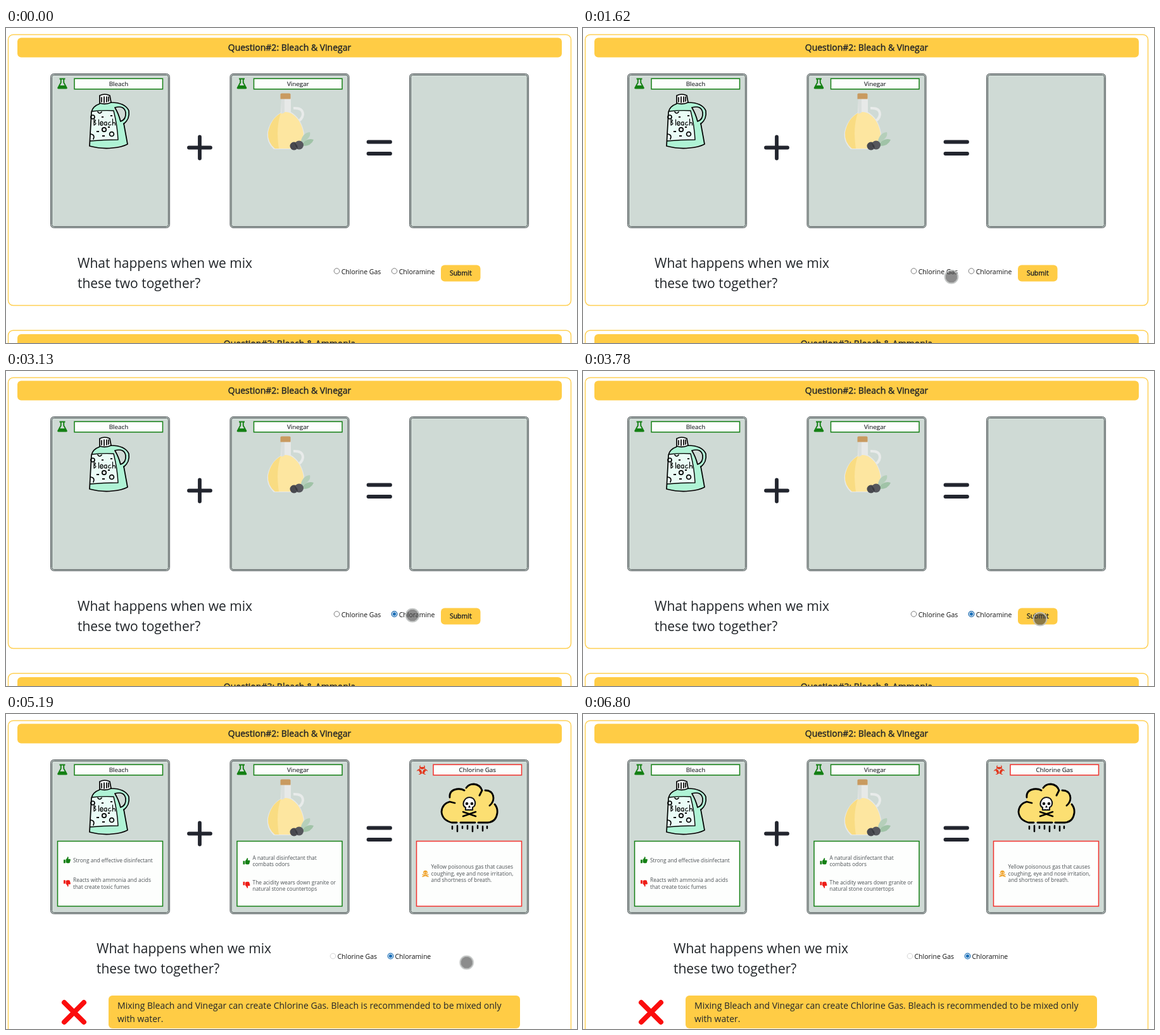
An HTML page for the animation above (7210 ms loop, 902 by 499 pixels).

```html
<!DOCTYPE html>
<html lang="en">
<head>
<meta charset="utf-8">
<title>Mixing quiz</title>
<style>
  html, body { margin: 0; width: 100%; height: 100%; overflow: hidden; background: #fff; }
  svg { display: block; width: 902px; height: 499px; font-family: "Open Sans", sans-serif; }
  text { fill: #212529; white-space: pre; }
  .mid { text-anchor: middle; }
  .title { font-size: 14px; stroke: #212529; stroke-width: .4px; }
  .label { font-size: 9.8px; stroke: #212529; stroke-width: .15px; }
  .ask { font-size: 21px; }
  .opt { font-size: 10.5px; fill: #111; }
  .btn { font-size: 10.5px; stroke: #212529; stroke-width: .4px; }
  .note { font-size: 8.4px; fill: #4c5155; }
  .msg { font-size: 14px; }
  .bar { fill: #ffcc45; }
  .panel { fill: none; stroke: #ffcf50; stroke-width: 1.4; }
  .box { fill: #fdfefd; stroke: #148014; stroke-width: 1.5; }
  .red { stroke: #f3312c; }
  .ink { fill: none; stroke: #000; stroke-width: 1.7; stroke-linecap: round; stroke-linejoin: round; }
  .ring { fill: #fff; stroke: #767676; stroke-width: 1; }
  .blue { fill: #fff; stroke: #1b6fb8; stroke-width: 1.2; }
  .dot { fill: #1b6fb8; }

  .before, .after, .first, .second, .cursor { animation: 7210ms infinite step-end; }
  .before { animation-name: before; }
  .after { animation-name: after; }
  .first { animation-name: first; }
  .second { animation-name: second; }
  .cursor { animation-name: move; animation-timing-function: ease-in-out; }
  @keyframes before { 0% { opacity: 1 } 58.95%, 100% { opacity: 0 } }
  @keyframes after { 0% { opacity: 0 } 58.95%, 100% { opacity: 1 } }
  @keyframes first { 0% { opacity: 0 } 32.04% { opacity: 1 } 41.47%, 100% { opacity: 0 } }
  @keyframes second { 0% { opacity: 0 } 41.47%, 100% { opacity: 1 } }
  @keyframes move {
    0%, 7.49% { transform: translate(650px, 482px); opacity: 0; animation-timing-function: linear }
    10.26% { transform: translate(643px, 471px); opacity: 1; animation-timing-function: linear }
    14.15% { transform: translate(628px, 450px); animation-timing-function: linear }
    16.92%, 17.89% { transform: translate(612px, 428px) }
    23.44%, 34.81% { transform: translate(580px, 392px) }
    39.53%, 47.02% { transform: translate(642px, 387px) }
    52.43%, 71.01% { transform: translate(722px, 393px) }
    77.53%, 89.6% { transform: translate(845px, 407px); opacity: 1; animation-timing-function: linear }
    94.31%, 100% { transform: translate(845px, 407px); opacity: 0 }
  }
</style>
</head>
<body>
<svg viewBox="0 0 902 499">
  <defs>
    <g id="card">
      <rect x=".5" y=".5" width="188" height="244" rx="5" fill="#cfdad5" stroke="#464c4f"/>
      <rect x="2.5" y="2.5" width="184" height="240" rx="3" fill="none" stroke="#464c4f"/>
    </g>
    <rect id="name" x="38" y="8.2" width="139.5" height="16.6"/>
    <rect id="info" x="11.5" y="129.5" width="166" height="103"/>
    <g id="flask" fill="#148014">
      <path d="M-4.5-8.5h9v2h-1.3v4.7L7.5 6Q8.5 8.5 6 8.5H-6Q-8.5 8.5-7.5 6L-3.2-1.8v-4.7h-1.3z"/>
      <path d="M-1.3-6.5h2.6v5.2L3.7 3h-7.4L-1.3-1.3z" fill="#cfdad5"/>
    </g>
    <path id="thumb" d="M-5.5-.8h2.8v5.6h-2.8zM-2-.8L.3-3.7Q.4-6 1.7-5.2 2.8-4.4 1.8-1.8H4.6Q6-1.4 5.3.3L4.2 4Q3.8 4.8 2.8 4.8H0L-2 3.8z"/>
    <g id="claw">
      <path d="M-2.4-2Q-6.3-5-2.7-8.6-4-4.4 0-4.2 4-4.4 2.7-8.6 6.3-5 2.4-2L0-1.2z"/>
    </g>
    <g id="skull">
      <path d="M-3.2.4Q-4.4-4.6 0-4.8 4.4-4.6 3.2.4L1.7 1V2h-3.4V1z"/>
      <path d="M-4.5 1.8L4.5 5M4.5 1.8L-4.5 5" fill="none" stroke="#f0a32c" stroke-width="1.4" stroke-linecap="round"/>
      <path d="M-2.2-1.7h1.3v1.4h-1.3zM.9-1.7h1.3v1.4H.9z" fill="#fff"/>
    </g>
  </defs>

  <rect width="902" height="499" fill="#fff"/>
  <rect class="bar" x="18" y="15.5" width="860" height="31" rx="6"/>
  <text class="title mid" x="448" y="36">Question#2: Bleach &amp; Vinegar</text>

  <use href="#card" x="70" y="72"/>
  <use href="#card" x="353.5" y="72"/>
  <use href="#card" x="637" y="72"/>
  <g class="box">
    <use href="#name" x="70" y="72"/>
    <use href="#name" x="353.5" y="72"/>
  </g>
  <use href="#flask" x="89" y="88"/>
  <use href="#flask" x="372.5" y="88"/>
  <text class="label mid" x="178" y="92">Bleach</text>
  <text class="label mid" x="461.3" y="92">Vinegar</text>

  <!-- bleach bottle -->
  <g>
    <path d="M149 119Q138 123 135 133L132 187Q160 193 192 184L187 152Q197 142 194 131 188 119 166 118z" fill="#aff3d5"/>
    <path d="M174 125Q188 123 190 134 190 145 181 148 177 136 170 127z" fill="#cfdad5"/>
    <path d="M136 132L170 131Q176 155 177 177L133 178z" fill="#eafcf6"/>
    <path d="M148 107Q156 103 164 107L166 118Q157 122 148 119z" fill="#f4f8f6"/>
    <g class="ink">
      <path d="M148 107Q156 103 164 107L166 118Q157 122 148 119zM151 110v7M155 109v9M159 109v8M162 109v7"/>
      <path d="M148 120Q137 124 135 133L132 187Q152 192 168 190 183 189 192 184L186 151"/>
      <path d="M166 118Q188 118 194 131 196 144 186 152M172 126Q187 122 189 134 190 145 181 148 178 136 172 126"/>
      <path d="M136 132Q154 130 170 131 176 155 177 177M133 179Q154 177 177 177" stroke-width="1.4"/>
      <circle cx="155" cy="161" r="3.2"/>
      <circle cx="167" cy="168" r="3.4"/>
      <circle cx="137" cy="141" r="3"/>
      <path d="M145 133q3 4 6 0M134 168q7 1 4 8" />
    </g>
    <path d="M143 163h4v2h-4zM161 156h3v2h-3zM152 170h4v2h-4zM165 138h3v2h-3zM151 140h3v2h-3z"/>
    <path class="ink" stroke-width="1.2" style="stroke-width:1.2" d="M139 145v9M139 145q5 1 0 4 6 2 0 5M146.500 145v9M149 151h4q0-3-2-3-3 1-2 5 2 2 4 0M159 149q-4-1-4 3 1 3 4 1v-4 5M165 149q-4 0-3 4 1 2 4 0M168.500 144v10M168.500 151q4-4 4 3"/>
  </g>

  <!-- vinegar bottle -->
  <g>
    <path d="M454 127Q469 126 469 137 468 146 458 149" fill="none" stroke="#e8ebea" stroke-width="4"/>
    <path d="M435 111h15v22Q466 142 471 166 471 184 461 192H423Q411 181 413 165 417 145 434 134z" fill="#e7e9e8"/>
    <path d="M434 135Q441 131 450 135 466 144 470 167 469 184 459 191H425Q413 181 414 166 418 144 434 135z" fill="#fde6a0"/>
    <path d="M434 135Q426 158 431 191H425Q413 181 414 166 418 144 434 135z" fill="#f9dc82"/>
    <path d="M435 112h5v22l-5 2z" fill="#dadfdd"/>
    <path d="M433.500 105q0-1.500 2-1.500h12q2 0 2 1.500v7.500h-16z" fill="#c99a60"/>
    <path d="M465 184Q467 166 480 165 483 174 465 184" fill="#b5cfba"/>
    <path d="M466 187Q474 173 486 177 482 188 466 187" fill="#a0c3a7"/>
    <circle cx="455" cy="187" r="6.500" fill="#48494f"/>
    <circle cx="463" cy="185.500" r="7" fill="#56575d"/>
    <path d="M456 182q5 3 5 9-5-2-5-9" fill="#393a40"/>
  </g>

  <path d="M306 172.500v34M289 189.500h34M572.500 180.500h34.500M572.500 199h34.500" fill="none" stroke="#22252e" stroke-width="5.800" stroke-linecap="round"/>

  <g class="before">
    <rect class="panel" x="3.500" y="10.500" width="889" height="429" rx="8"/>
    <rect class="panel" x="3.500" y="479" width="889" height="429" rx="8"/>
    <rect class="bar" x="18" y="485" width="860" height="31" rx="6"/>
    <text class="title mid" x="448" y="504.500">Question#3: Bleach &amp; Ammonia</text>
    <text class="ask" x="113" y="380">What happens when we mix</text>
    <text class="ask" x="113" y="412">these two together?</text>
    <circle class="ring" cx="522.500" cy="385" r="4.300"/>
    <circle class="ring" cx="613.500" cy="385" r="4.300"/>
    <g class="first">
      <circle class="blue" cx="522.500" cy="385" r="4.300"/>
      <circle class="dot" cx="522.500" cy="385" r="2.700"/>
    </g>
    <g class="second">
      <circle class="blue" cx="613.500" cy="385" r="4.300"/>
      <circle class="dot" cx="613.500" cy="385" r="2.700"/>
    </g>
    <text class="opt" x="529.700" y="390">Chlorine Gas</text>
    <text class="opt" x="620.700" y="390">Chloramine</text>
    <rect class="bar" x="687" y="375.500" width="62.500" height="26" rx="6"/>
    <text class="btn mid" x="718.300" y="392">Submit</text>
  </g>

  <g class="after">
    <rect class="panel" x="3.500" y="10.500" width="889" height="560" rx="8"/>
    <g class="box">
      <use href="#info" x="70" y="72"/>
      <use href="#info" x="353.500" y="72"/>
    </g>
    <g class="box red">
      <use href="#name" x="637" y="72"/>
      <use href="#info" x="637" y="72"/>
    </g>
    <text class="label mid" x="744.800" y="92">Chlorine Gas</text>
    <g transform="translate(657.500 89)" fill="#e2371d">
      <use href="#claw"/>
      <use href="#claw" transform="rotate(120)"/>
      <use href="#claw" transform="rotate(240)"/>
      <circle r="4.700" fill="none" stroke="#e2371d" stroke-width="1.300"/>
      <circle r="1.300" fill="#cfdad5"/>
    </g>

    <!-- gas cloud -->
    <path d="M703 171Q689 167 688 154 689 142 701 138 698 120 713 119 719 118 724 120 728 111 739 111 749 112 753 121 768 120 770 133 770 137 769 140 777 146 776 157 774 170 761 172z" fill="#fcdf72"/>
    <g class="ink" style="stroke-width:2.800">
      <path d="M712 172H704Q689 168 688 155 689 142 701 139L709 141M701 132Q700 121 712 119 719 118 724 121M727 117Q731 111 739 111 749 112 752 121L748 129M757 121Q769 121 770 133 770 140 764 145M772 143Q777 149 776 157 774 171 761 172H746M718 172h23"/>
      <path d="M705 178v4M713 177v9M721 178v3M729 177v5M737 178v8M745 177v4M753 178v7M760 178v3" stroke-width="2.500"/>
      <path d="M722 155L742 162M742 155L722 162" stroke-width="2.500"/>
    </g>
    <path d="M726 148Q721 146 723 139 726 132 732 132 739 132 741 139 742 146 737 148V152H726z" fill="#fff" stroke="#17181b" stroke-width="2.200" stroke-linejoin="round"/>
    <circle cx="728" cy="142" r="2.300"/>
    <circle cx="736" cy="142" r="2.300"/>
    <path d="M732 145l1.500 3h-3zM730 150v2M734 150v2" stroke="#000" stroke-width=".6"/>

    <use href="#thumb" x="96.500" y="231.500" fill="#148014"/>
    <use href="#thumb" x="380" y="233.500" fill="#148014"/>
    <use href="#thumb" transform="translate(96.500 268) scale(1 -1)" fill="#ee1c16"/>
    <use href="#thumb" transform="translate(380 270.500) scale(1 -1)" fill="#ee1c16"/>
    <use href="#skull" x="662.500" y="252.500" fill="#f0a32c"/>
    <g class="notes">
      <text class="note" x="106" y="235">Strong and effective disinfectant</text>
      <text class="note" x="106" y="266">Reacts with ammonia and acids</text>
      <text class="note" x="106" y="276.500">that create toxic fumes</text>
      <text class="note" x="389.500" y="231">A natural disinfectant that</text>
      <text class="note" x="389.500" y="241">combats odors</text>
      <text class="note" x="389.500" y="270">The acidity wears down granite or</text>
      <text class="note" x="389.500" y="280">natural stone countertops</text>
      <text class="note" x="671.500" y="245">Yellow poisonous gas that causes</text>
      <text class="note" x="671.500" y="256">coughing, eye and nose irritation,</text>
      <text class="note" x="671.500" y="266">and shortness of breath.</text>
    </g>

    <text class="ask" x="143" y="379">What happens when we mix</text>
    <text class="ask" x="143" y="411">these two together?</text>
    <circle class="ring" cx="516.500" cy="383.500" r="4.300" style="stroke:#d2d2d2"/>
    <circle class="blue" cx="607.500" cy="383.500" r="4.300"/>
    <circle class="dot" cx="607.500" cy="383.500" r="2.700"/>
    <text class="opt" x="523.500" y="388">Chlorine Gas</text>
    <text class="opt" x="614.500" y="388">Chloramine</text>

    <path d="M92 457l31 31M123 457l-31 31" fill="none" stroke="#fb0d0d" stroke-width="8" stroke-linecap="round"/>
    <rect class="bar" x="162" y="446" width="650" height="52" rx="6"/>
    <text class="msg" x="176" y="467">Mixing Bleach and Vinegar can create Chlorine Gas. Bleach is recommended to be mixed only</text>
    <text class="msg" x="176" y="488">with water.</text>
  </g>

  <g class="cursor">
    <circle r="9.500" fill="#464646" fill-opacity=".62"/>
    <circle r="10.400" fill="none" stroke="#b9bcbb" stroke-width="1.800" stroke-opacity=".9"/>
  </g>
</svg>
</body>
</html>
```
